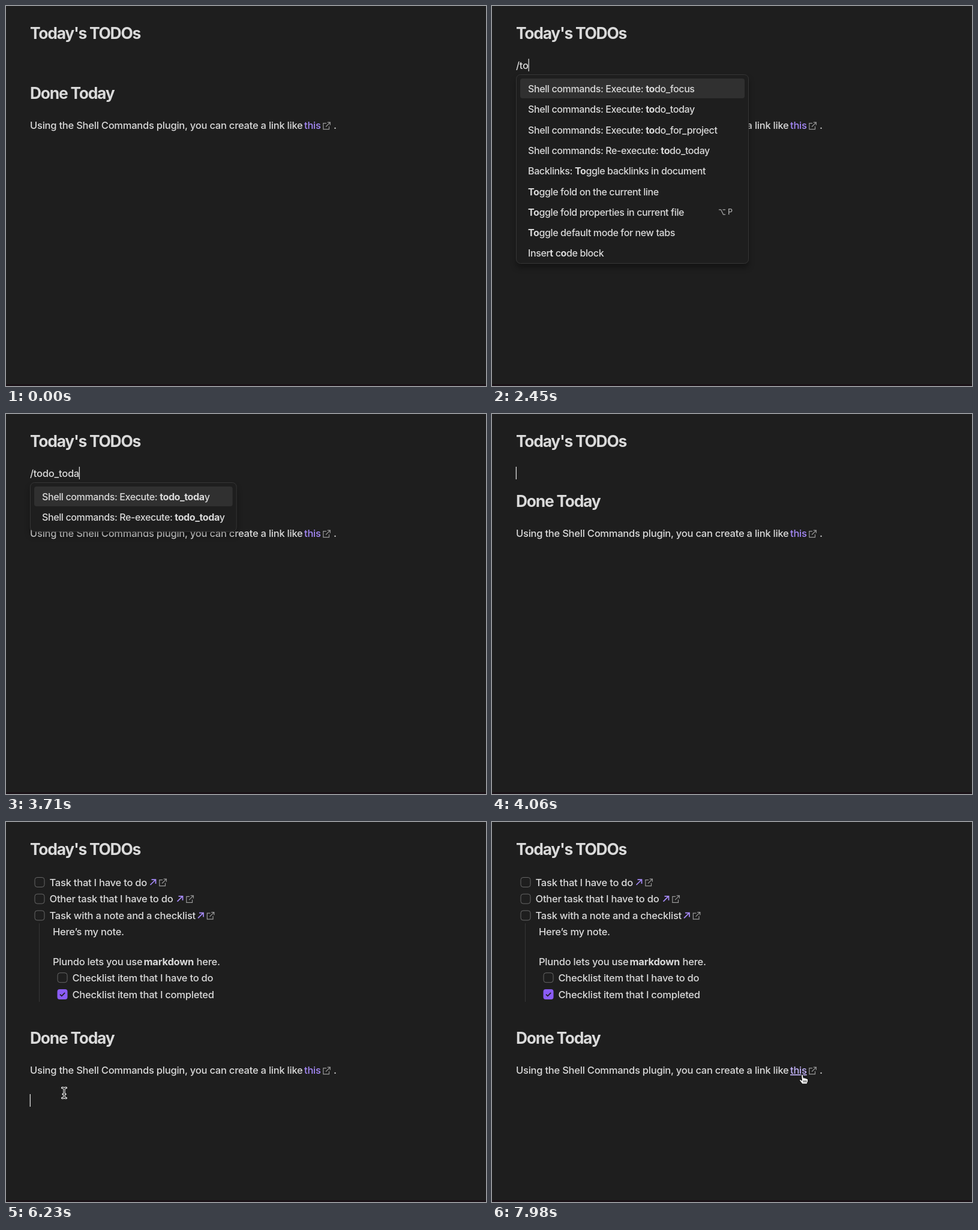
An HTML page for the animation above (8 s loop, 800x634 px).

```html
<!DOCTYPE html>
<html lang="en">
<head>
<meta charset="utf-8">
<title>Today's TODOs</title>
<style>
  html, body { margin: 0; width: 100%; height: 100%; overflow: hidden; background: #1e1e1e; }
  svg { display: block; width: 800px; height: 634px; }
  text { font: 450 16.5px Inter, sans-serif; letter-spacing: -.23px; fill: #dadada; white-space: pre; }
  .h { font-size: 26.4px; font-weight: 650; letter-spacing: -1.24px; }
  .b { font-weight: 700; }
  .menu { font-size: 16px; letter-spacing: -.38px; }
  .key { font-size: 12.5px; fill: #aaa; }
  .link { fill: #a68af9; }
  .hover { fill: #c5b6fc; text-decoration: underline; }
  path { fill: none; }
  .popup { filter: drop-shadow(0 7px 5px #0005); }
</style>
</head>
<body>
<svg id="stage" viewBox="0 0 800 634"></svg>
<script>
const LOOP = 8000, STEP = 70;
const stage = document.getElementById('stage');
const pen = document.createElement('canvas').getContext('2d');

const COMMANDS = [
  'Shell commands: Execute: todo_focus',
  'Shell commands: Execute: todo_today',
  'Shell commands: Execute: todo_for_project',
  'Shell commands: Re-execute: todo_today',
  'Backlinks: Toggle backlinks in document',
  'Insert code block',
  'Toggle fold on the current line',
  'Toggle fold properties in current file',
  'Toggle default mode for new tabs'
];
const KEYS = [[2240, 1], [2380, 2], [2450, 3], [2590, 4], [2660, 5],
              [2940, 6], [3150, 7], [3360, 8], [3500, 9], [3710, 10]];
const ENTER = 3990, INSERT = 4130, CLICK = 6230;
// spans in which the caret is shown
const CARET = [[1120, 1610], [2100, 4620], [5110, 5600], [6090, 6720], [7210, 7840]];
// time, x, y
const MOUSE = [[140, 30, 160], [280, 120, 144], [490, 120, 144], [560, 145, 137], [700, 60, 91],
               [4760, 60, 91], [4900, 59, 100], [5110, 59, 100], [5880, 86, 482], [6160, 97, 452],
               [6720, 97, 452], [7490, 513, 428], [7630, 518, 421], [8000, 518, 421]];

const label = (x, y, s, cls = '') => `<text x="${x}" y="${y}" class="${cls}">${s}</text>`;
const line = (x, y, d, color, w, cap = 'butt') =>
  `<path transform="translate(${x} ${y})" d="${d}" stroke="${color}" stroke-width="${w}" stroke-linecap="${cap}"/>`;
const box = (x, y, w, h, r, attrs) =>
  `<rect x="${x}" y="${y}" width="${w}" height="${h}" rx="${r}" ${attrs}/>`;
const outIcon = (x, y) =>
  line(x, y, 'M6 2.2H.8V12.2H10.5V7.2M7.7 .7H12.3V5.3M12.3 .7L5 8', '#999', 1.2);
const checkbox = (x, y, color = '#666') =>
  box(x - 8, y - 8, 16, 16, 4, `fill="none" stroke="${color}"`);

function width(s, size, spacing, weight = 450) {
  pen.font = `${weight} ${size}px Inter, sans-serif`;
  pen.letterSpacing = spacing + 'px';
  return pen.measureText(s).width;
}

// Marks matched letters: a whole substring if there is one, else in order.
function match(s, query) {
  const low = s.toLowerCase(), at = low.indexOf(query), hits = new Set();
  let i = at < 0 ? 0 : at;
  for (const c of query) {
    i = low.indexOf(c, i);
    if (i < 0) return null;
    hits.add(i++);
  }
  const runs = [];
  [...s].forEach((c, k) => {
    const bold = hits.has(k), last = runs[runs.length - 1];
    if (last && last.bold === bold) last.s += c;
    else runs.push({ s: c, bold });
  });
  return { runs, exact: at >= 0, s };
}

function popup(query) {
  const rows = COMMANDS.map(s => match(s, query)).filter(Boolean).sort((a, b) => b.exact - a.exact);
  const full = rows.length > 4;
  const longest = Math.max(...rows.map(r =>
    r.runs.reduce((sum, run) => sum + width(run.s, 16, -.38, run.bold ? 700 : 450), 0)));
  const w = full ? 387 : longest + 39;
  const h = Math.min(316, rows.length * 34.3 + 14);
  let out = `<g class="popup">${box(40.5, 114.5, w, h - 1, 7, 'fill="#1e1e1e" stroke="#363636"')}</g>` +
    box(47, 121, w - 13, 33, 4, 'fill="#303030"');
  rows.forEach((r, i) => {
    const y = 144 + i * 34.3;
    out += label(60, y, r.runs.map(run =>
      run.bold ? `<tspan class="b">${run.s}</tspan>` : run.s).join(''), 'menu');
    if (r.s.includes('properties'))
      out += line(378, y - 11, 'M0 1H3.5L7.5 9H11M6.5 1H11', '#aaa', 1.2) + label(393, y - 2, 'P', 'key');
  });
  return out;
}

function tasks(hover) {
  let out = '';
  [['Task that I have to do', 240], ['Other task that I have to do', 285],
   ['Task with a note and a checklist', 319.5]].forEach(([s, x], i) => {
    const y = 100.5 + i * 27.7;
    out += checkbox(56, y, hover && !i ? '#aaa' : '#666') + label(72.5, y + 6, s) +
      line(x, y - 5, 'M.5 9.5L9.5 .5M2.5 .7H9.5V7.5', '#a68af9', 1.7) + outIcon(x + 15, y - 6);
  });
  return out + box(55, 169, 1, 131, 0, 'fill="#363636"') +
    label(78, 189, 'Here’s my note.') +
    label(78, 239, 'Plundo lets you use') + label(229.5, 239, 'markdown', 'b') + label(317.5, 239, 'here.') +
    checkbox(94, 259.7) + label(110.5, 265.7, 'Checklist item that I have to do') +
    box(85.5, 279, 17, 17, 4, 'fill="#8a5cf5"') +
    line(90, 284, 'M0 3.7L2.8 6.3L8.2 .8', '#1e1e1e', 1.7) +
    label(110.5, 293.5, 'Checklist item that I completed');
}

function mouseAt(t) {
  if (t < MOUSE[0][0] || t >= KEYS[0][0] && t < 4760) return null;
  const i = MOUSE.findIndex(p => p[0] > t);
  const [t0, x0, y0] = MOUSE[i - 1], [t1, x1, y1] = MOUSE[i];
  const p = (t - t0) / (t1 - t0), e = p * p * (3 - 2 * p);
  const dip = t0 === 6720 ? 25 * Math.sin(Math.PI * e) : 0;
  return { x: x0 + (x1 - x0) * e, y: y0 + (y1 - y0) * e + dip };
}

function cursor(m, kind) {
  if (kind === 'beam') {
    const d = 'M-3.4 -8.6Q0 -8.6 0 -6V6Q0 8.6 -3.4 8.6M3.4 -8.6Q0 -8.6 0 -6M3.4 8.6Q0 8.6 0 6M-2 2H2';
    return line(m.x, m.y, d, '#fff', 3.2, 'round') + line(m.x, m.y, d, '#111', 1.2);
  }
  const shape = (d, fill, stroke) =>
    `<path transform="translate(${m.x} ${m.y})" d="${d}" style="fill:${fill}" stroke="${stroke}" stroke-width="1.1"/>`;
  if (kind === 'arrow')
    return shape('M0 0V15.5L3.6 12.2L6 18L8.7 16.8L6.3 11.3H11Z', '#111', '#fff');
  return shape('M-2.5 1.5Q-2.5 0 -1.2 0Q0 0 .3 1.5L1.2 6Q3 5 4 6.5Q5.5 5.8 6.3 7.2Q8.6 6.8 8.6 9V11.5L7 16H-1L-5.3 10.5Q-6 8.5 -4.3 8.5L-1.6 10Z',
    '#fff', '#111') + line(m.x, m.y, 'M1.2 10V13.5M3.4 10V13.5M5.6 10V13.5', '#111', .9);
}

function scene(t) {
  const inserted = t >= INSERT, shift = inserted ? 215 : 0;
  const key = KEYS.filter(k => k[0] <= t).pop();
  const typed = key && t < ENTER ? '/todo_toda'.slice(0, key[1]) : '';
  const m = mouseAt(t);
  const onBox = m && inserted && m.x < 66 && Math.abs(m.y - 102) < 9;
  const onLink = m && inserted && m.x > 496 && Math.abs(m.y - 414) < 13;

  let out = label(40, 54.5, "Today's TODOs", 'h') + label(40, 154.5 + shift, 'Done Today', 'h') +
    label(40, 205 + shift, 'Using the Shell Commands plugin, you can create a link like') +
    label(497, 205 + shift, 'this', onLink ? 'hover' : 'link') +
    outIcon(528, 193.5 + shift) + label(546, 205 + shift, '.');
  if (inserted) out += tasks(onBox);
  if (typed) out += label(40, 105, typed) + popup(typed.slice(1));
  if (CARET.some(([a, b]) => t >= a && t < b)) {
    const y = t >= CLICK ? 454 : inserted ? 303 : 88;
    out += box(39.7 + width(typed, 16.5, -.23), y, 1.3, 21, 0, 'fill="#dadada"');
  }
  if (m) out += cursor(m, onBox ? 'arrow' : onLink ? 'hand' : 'beam');
  return out + box(0, 631, 800, 3, 0, 'fill="#1a1217"');
}

let shown = -1;
function frame(now) {
  const step = Math.floor(now % LOOP / STEP);
  if (step !== shown) stage.innerHTML = scene((shown = step) * STEP);
  requestAnimationFrame(frame);
}
requestAnimationFrame(frame);
</script>
</body>
</html>
```
